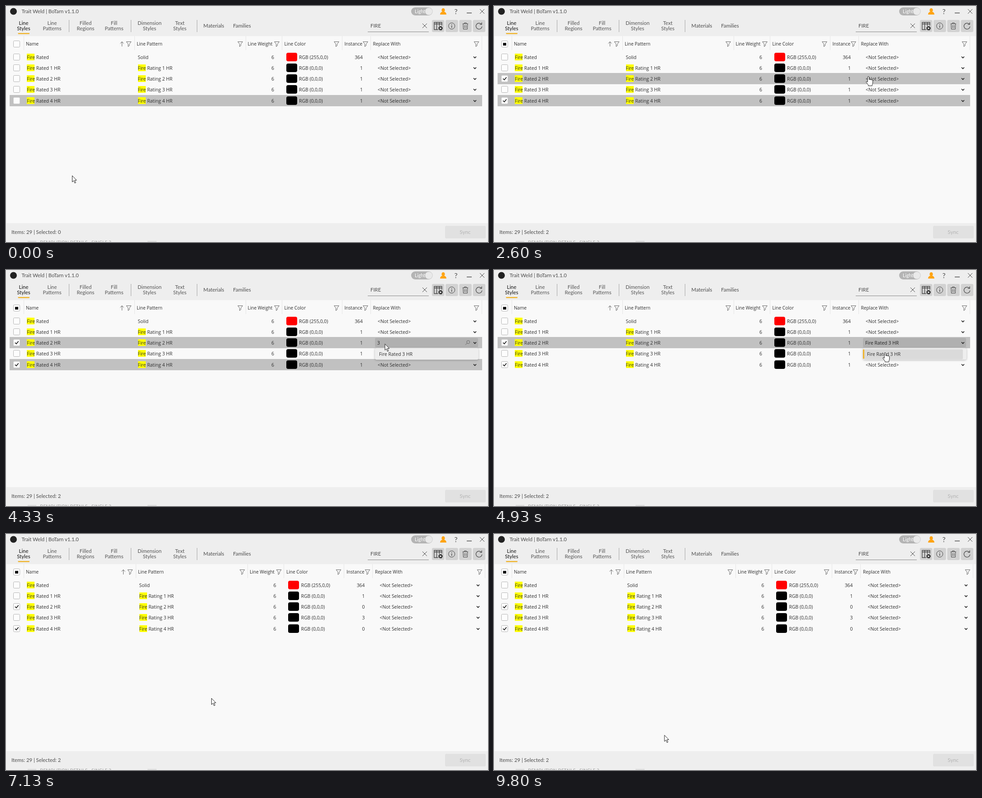
Write an HTML page that moves like this. It is 1066 px wide and 525 px high and loops after 9870 ms.

```html
<!DOCTYPE html>
<html lang="en">
<head>
<meta charset="utf-8">
<title>Trait Weld</title>
<style>
  html, body { margin: 0; width: 100%; height: 100%; overflow: hidden; background: #f9f9f9; }
  svg { display: block; }
  text { font: 10.4px "Open Sans", "Noto Sans", sans-serif; fill: #2e2e2e; white-space: pre; }
  .head { font-size: 10.1px; }
  .ui { font: 11.3px Lato, sans-serif; fill: #4c4c4c; }
  .mid { text-anchor: middle; }
  .end { text-anchor: end; }
  .line { fill: none; stroke: #444; stroke-width: 1; }
  .popup { filter: drop-shadow(0 1px 2px #0004); }
</style>
</head>
<body>
<svg width="100%" height="100%" viewBox="0 0 1066 525">
  <g id="chrome"></g>
  <g id="table"></g>
  <g id="combo"></g>
  <g id="cursor" stroke="#222" fill="#fff" stroke-linejoin="round">
    <path id="arrow" d="M.5 .5V14.4L3.8 11.4L6.1 17L8.3 16L6 10.6H10.2Z"/>
    <path id="hand" d="M-1.7 11.5V1.4a1.6 1.6 0 0 1 3.2 0V6.8q1.6-1.2 3 .2q1.8-.9 3 .5q1.9-.6 2.2 1.2V13q0 3-1.4 5.3V20.6H-.2V18.6L-4.7 12.8q-.8-1.6.6-2.1q1.3-.2 2.4 1.6z"/>
  </g>
</svg>
<script>
const LOOP = 9870, FPS = 15, LAST = 147;
const byId = id => document.getElementById(id);
const escape = s => String(s).replace(/</g, '&lt;').replace(/>/g, '&gt;');
const text = (x, y, s, cls = '', extra = '') => `<text x="${x}" y="${y}" class="${cls}" ${extra}>${escape(s)}</text>`;
const rect = (x, y, w, h, fill, extra = '') => `<rect x="${x}" y="${y}" width="${w}" height="${h}" fill="${fill}" ${extra}/>`;
const path = (d, extra = '') => `<path class="line" d="${d}" ${extra}/>`;
const at = (x, y, s) => `<g transform="translate(${x} ${y})">${s}</g>`;
const between = (t, a, b) => t >= a && t < b;

const cross = path('M-5-5L5 5M5-5L-5 5');
const funnel = path('M-5.3-5H5.3L1.4 .2V3.6L-1.4 5.8V.2Z', 'style="stroke:#555;stroke-width:.9"');
const chevron = path('M-3-1.5L0 1.5L3-1.5', 'style="stroke:#222;stroke-width:1.7"');

function drawChrome() {
  const tabs = [[39, 'Line', 'Styles'], [102, 'Line', 'Patterns'], [176, 'Filled', 'Regions'],
    [239, 'Fill', 'Patterns'], [317.5, 'Dimension', 'Styles'], [384.5, 'Text', 'Styles']];
  const gear = '<circle cx="5.5" cy="5" r="3" fill="#d2d2d2" stroke="#222" stroke-width="1.8"/>' +
    '<circle cx="5.5" cy="5" r="4.4" fill="none" stroke="#222" stroke-width="1.3" stroke-dasharray="1.7 1.75"/>';
  const icons = [
    path('M0 8H-8.5V-8H8.5V-1M-8.5-4.5H8.5M-3-8V8M3-8V0', 'style="stroke-width:1.3"') + gear,
    '<circle r="7" class="line"/>' + path('M0-1V4M0-4V-2.6', 'style="stroke-width:1.3"'),
    path('M-6-5H6M-2.2-5V-7H2.2V-5M-5-5L-4.4 7H4.4L5-5M-1.7-2V4.5M1.7-2V4.5'),
    path('M5.2-4A6.7 6.7 0 1 0 6.7 1M6-8V-3.5H1.4', 'style="stroke-width:1.2"')
  ];
  byId('chrome').innerHTML =
    rect(0, 0, 1066, 525, '#f9f9f9') + rect(0, 0, 1066, 67, '#eee') + rect(0, 483, 1066, 42, '#eee') +
    rect(0, 0, 1, 525, '#f7f7f7') +
    '<circle cx="16.5" cy="12" r="7.5" fill="#222"/>' +
    text(34.5, 16, 'Trait Weld | BoTarn v1.1.0', 'ui') +
    rect(896, 3, 47.5, 18, '#b4b4b4', 'rx="9"') + text(904, 16, 'Light', 'ui', 'style="font-size:10.6px;fill:#fff"') +
    '<circle cx="935" cy="12" r="8" fill="#e9e9e9"/>' +
    '<path fill="#ffa412" d="M967 5a3.7 4.2 0 0 1 2 7.7q5 1.2 5 6.3H960q0-5.1 5-6.3a3.7 4.2 0 0 1 2-7.7z"/>' +
    text(995, 17.5, '?', 'ui mid', 'style="font-size:16px"') +
    path('M1019 15.5H1030', 'style="stroke-width:1.4"') + at(1053, 12, cross) +
    tabs.map(([x, a, b], i) => {
      const shade = `style="fill:${i ? '#555' : '#111'}"`;
      return text(x, 42, a, 'ui mid', shade) + text(x, 54, b, 'ui mid', shade);
    }).join('') +
    text(459.5, 48, 'Materials', 'ui mid') + text(522, 48, 'Families', 'ui mid') +
    path('M139.5 31V58M276.5 31V58M422.5 31V58', 'style="stroke:#a5a5a5"') +
    rect(26.5, 60, 25.5, 2.5, '#efb42e', 'rx="1"') +
    text(806, 48, 'FIRE', 'ui') + at(926, 44, cross) + path('M800 57.5H935', 'style="stroke:#888"') +
    icons.map((icon, i) => rect(942 + i * 30.2, 31, 27.5, 27, '#d2d2d2', 'rx="3"') + at(955.5 + i * 30.2, 44.5, icon)).join('') +
    rect(0, 523, 1066, 2, '#f4f4f4') +
    rect(48, 523, 19, 1, '#c8c8c8') + rect(313, 523, 20, 1, '#c8c8c8') +
    '<svg x="70" y="522" width="170" height="3">' + text(5, 8, 'DEMOLITION DETAILS - SINGLE 2', '', 'style="fill:#999"') + '</svg>';
}

function checkbox(y, { checked, pressed, partial, selected }) {
  const stroke = pressed ? '#333' : selected ? '#d4d4d4' : '#b4b4b4';
  return rect(16.5, y - 7.5, 14, 14, pressed ? '#d8d8d8' : '#fdfdfd', `rx="2" stroke="${stroke}"`) +
    (partial ? rect(20, y - 3, 7, 6, '#111') : '') +
    (checked ? path(`M20 ${y - .5}l2.8 2.9L27.6 ${y - 3.6}`, 'style="stroke:#111;stroke-width:1.6"') : '');
}

function drawTable(t) {
  const synced = t >= 6400, checked = t >= 1590;
  const near = synced ? 3 : 0, far = synced ? 4.5 : 0, edge = synced ? 7 : 0;
  const marked = (x, y, s) => rect(Math.round(x), y - 8, 17, 15, '#ff0') + text(x, y + 3.5, s);

  const headings = [[44, 'Name'], [289 + near, 'Line Pattern'], [534.5 + far, 'Line Weight'],
    [615.5 + far, 'Line Color'], [748.5 + far, 'Instance'], [811.5 + far, 'Replace With']];
  const funnels = [271.5 + near, 518 + far, 599 + far, 731 + far, 795 + far, 1040.5 + edge];
  const dividers = [39, 284 + near, 530 + far, 610 + far, 743 + far, 806 + far, 1052 + edge];

  let out = dividers.map(x => rect(Math.floor(x), 67, 1, 31, '#e5e5e5')).join('') +
    headings.map(([x, s]) => text(x, 88, s, 'head')).join('') +
    funnels.map(x => at(x, 84.5, funnel)).join('') +
    at(256.5 + near, 84.5, path('M0 5.5V-5M-4-1L0-5L4-1', 'style="stroke:#666"')) +
    checkbox(85, { partial: checked });

  for (let i = 0; i < 5; i++) {
    const y = Math.round(113.6 + i * 24.25), paired = i === 2 || i === 4;
    const selected = !synced && (i === 2 ? t >= 990 : i === 4 && !between(t, 4920, 5190));
    const replaced = !synced && (i === 2 ? t >= 5050 : i === 4 && t >= 5390);
    const count = i === 0 ? 364 : !synced || i === 1 ? 1 : i === 3 ? 3 : 0;
    if (selected) out += rect(8, y - 13, 1045, 25, '#c1c1c1');
    out += checkbox(y, { selected, checked: paired && checked, pressed: i === 2 && between(t, 1460, 1590) }) +
      marked(46.3, y, i ? `Fire Rated ${i} HR` : 'Fire Rated') +
      (i ? marked(291.6 + near, y, `Fire Rating ${i} HR`) : text(291.5 + near, y + 3.5, 'Solid')) +
      text(593 + far, y + 3.5, 6, 'end') +
      rect(Math.floor(620 + far), y - 10, 24, 19, i ? '#000' : '#f00', 'rx="4"') +
      text(648 + far, y + 3.5, i ? 'RGB (0,0,0)' : 'RGB (255,0,0)') +
      text(789 + far, y + 3.5, count, 'end') +
      (replaced ? text(821, y + 3.5, 'Fire Rated 3 HR') : text(822 + far, y + 3.5, '<Not Selected>')) +
      at(1037 + edge, y, chevron);
  }

  const ready = between(t, 5190, 6400);
  out += text(12, 507, `Items: 29 | Selected: ${checked ? 2 : 0}`, 'ui') +
    rect(971, 489, 90, 28, ready ? '#c3c3c3' : '#e1e1e1', 'rx="3"') +
    text(1015.5, 507, 'Sync', 'ui mid', `style="font-size:11.8px;fill:${ready ? '#444' : '#b4b4b4'}"`);
  byId('table').innerHTML = out;
}

function drawCombo(t) {
  const box = byId('combo');
  if (!between(t, 2790, 5050)) { box.innerHTML = ''; return; }
  const names = ['Not Selected', 'Area Based Load Boundary', 'Area Boundary', 'Axis of Rotation', 'Beyond',
    'Centerline', 'Demolished', 'Fabric Envelope', 'Fabric Sheets', 'Hidden Lines'];
  const filtered = t >= 3990, picked = t >= 4920, hovered = t >= 4520;
  const open = Math.min(1, (t - 2733) / 267);
  const height = filtered ? 26 : 237 * (1 - (1 - open) ** 2);
  const items = filtered
    ? (hovered ? rect(2, 3, 219, 22, '#dadada', 'rx="2"') : '') + text(9, 17.5, 'Fire Rated 3 HR')
    : names.map((s, i) => text(9.5, 17.5 + i * 25.05, `<${s}>`)).join('') + rect(222, 3, 4, 75, '#666', 'rx="2"');
  const bar = !filtered || picked ? rect(0, 3, 3, 21, '#efb42e', 'rx="1"') : '';
  const label = picked ? 'Fire Rated 3 HR' : filtered ? '3' : 'Search';
  box.innerHTML =
    rect(816, 151, 228, 21, '#b0b0b0', 'rx="3"') +
    text(821, 165.5, label, '', `style="fill:${filtered ? '#222' : '#666'}"`) +
    (picked ? '' : at(1021, 161.5, '<circle cx="1.2" cy="-1.2" r="3.4" class="line" style="stroke:#666"/>' +
      path('M-1.3 1.3L-5 5', 'style="stroke:#666"'))) +
    at(1037, 162, chevron) +
    rect(816, 173.5, 229, height, '#eee', 'rx="4" class="popup"') +
    `<svg x="816" y="173.5" width="229" height="${height}">${items}${bar}</svg>`;
}

// Pointer stops: time, x, y
const stops = [[0, 146, 377], [67, 146, 377], [930, 103, 170], [1000, 103, 170], [1333, 17, 166],
  [1600, 17, 166], [2400, 885, 134], [2600, 828, 157], [4200, 828, 157], [4600, 865, 184],
  [5333, 865, 184], [6000, 1028, 509], [6200, 1028, 509], [7133, 454, 365], [7400, 333, 384],
  [7900, 740, 132], [8133, 777, 170], [8270, 886, 156], [8660, 238, 512], [8733, 238, 540],
  [9660, 177, 540], [9733, 177, 505], [9800, 376.5, 447]];
const handTimes = [[1330, 1670], [2530, 4200], [4520, 5470], [5860, 6330]];

function drawCursor(t) {
  let i = 0;
  while (i < stops.length - 2 && t >= stops[i + 1][0]) i++;
  const [t0, x0, y0] = stops[i], [t1, x1, y1] = stops[i + 1];
  const u = Math.min(1, (t - t0) / (t1 - t0)), e = u * u * (3 - 2 * u);
  const hand = handTimes.some(([a, b]) => between(t, a, b));
  const hidden = between(t, 3920, 4250) || between(t, 8720, 9720);
  byId('cursor').setAttribute('transform', `translate(${x0 + (x1 - x0) * e} ${y0 + (y1 - y0) * e})`);
  byId('cursor').setAttribute('visibility', hidden ? 'hidden' : 'visible');
  byId('arrow').style.display = hand ? 'none' : '';
  byId('hand').style.display = hand ? '' : 'none';
}

let shown = -1;
const start = performance.now();
function tick() {
  const ms = (performance.now() - start) % LOOP;
  const step = Math.min(LAST, Math.floor(ms * FPS / 1000 + .06));
  if (step !== shown) {
    shown = step;
    const t = step * 1000 / FPS;
    drawTable(t);
    drawCombo(t);
    drawCursor(t);
  }
  requestAnimationFrame(tick);
}
drawChrome();
tick();
</script>
</body>
</html>
```
